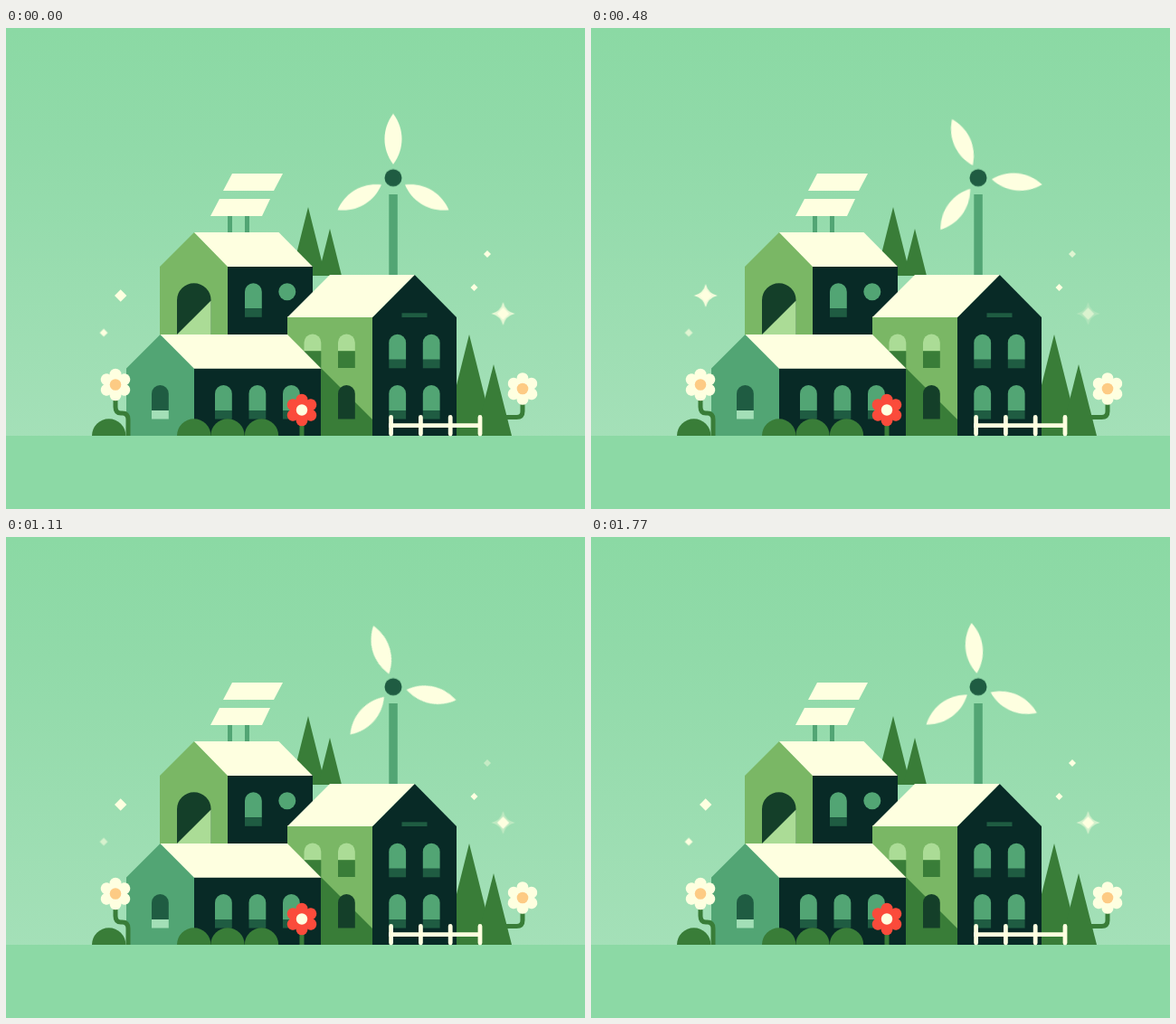
Animation, 640 px wide and 532 px high, one loop 1800 ms. Source, as an HTML page:

```html
<!DOCTYPE html>
<html lang="en">
<head>
<meta charset="utf-8">
<title>Green village</title>
<style>
  html, body { margin: 0; width: 100%; height: 100%; overflow: hidden; background: #8cd9a5; }
  svg { display: block; width: 100%; height: 100%; }

  .ivory { fill: #feffe0; }
  .dark { fill: #082a26; }
  .deep { fill: #143f29; }
  .pine { fill: #1f5c42; }
  .mid { fill: #52a574; }
  .olive { fill: #7ab765; }
  .pale { fill: #abdc96; }
  .leaf { fill: #397d38; }
  .stem { fill: none; stroke: #397d38; stroke-width: 5; }

  /* The small offset keeps each 30 ms step clear of its boundary. */
  .rotor { animation: spin 1.8s steps(60) -4ms infinite; }
  @keyframes spin { to { transform: rotate(360deg); } }

  .twinkle { animation: 1.8s linear infinite; }
  .left-rays { animation-name: left-rays; }
  .right-rays { animation-name: right-rays; }
  .right-core { animation-name: right-core; }
  .left-dot { animation-name: left-dot; }
  .right-dot { animation-name: right-dot; }

  @keyframes left-rays {
    0%, 8% { opacity: 0; }
    16.7% { opacity: .38; }
    26.7% { opacity: .9; }
    34% { opacity: 1; }
    46.7% { opacity: .45; }
    58%, 100% { opacity: 0; }
  }
  @keyframes right-rays {
    0% { opacity: .75; }
    16.7% { opacity: .5; }
    26.7% { opacity: .2; }
    36% { opacity: .5; }
    46.7% { opacity: .9; }
    61.7%, 83.3% { opacity: .35; }
    98.3% { opacity: .55; }
    100% { opacity: .75; }
  }
  @keyframes right-core {
    0%, 16.7% { opacity: 1; }
    26.7% { opacity: .55; }
    38%, 100% { opacity: 1; }
  }
  @keyframes left-dot {
    0%, 16.7% { opacity: 1; }
    26.7% { opacity: .7; }
    46.7% { opacity: .4; }
    61.7% { opacity: .6; }
    80%, 100% { opacity: 1; }
  }
  @keyframes right-dot {
    0%, 16.7% { opacity: 1; }
    26.7% { opacity: .7; }
    46.7% { opacity: .28; }
    61.7% { opacity: .45; }
    83.3% { opacity: .85; }
    92%, 100% { opacity: 1; }
  }
</style>
</head>
<body>
<svg viewBox="0 0 640 532" preserveAspectRatio="none">
  <defs>
    <linearGradient id="sky" x2="0" y2="1">
      <stop stop-color="#8bd9a4"/>
      <stop offset=".3" stop-color="#91daa9"/>
      <stop offset="1" stop-color="#a4e0b8"/>
    </linearGradient>
    <path id="arch" d="M0 28V9.4a9.4 9.4 0 0 1 18.8 0V28z"/>
    <path id="sill" d="M0 28h18.8v9.5H0z"/>
    <g id="window"><use href="#arch" class="mid"/><use href="#sill" class="pine"/></g>
    <path id="blade" d="M0-71C12.7-54 12.7-32 0-15C-12.7-32-12.7-54 0-71z"/>
    <path id="gem" d="M0-1L1 0L0 1L-1 0z"/>
    <path id="rays" d="M0-13Q2.5-2.5 13 0Q2.5 2.5 0 13Q-2.5 2.5-13 0Q-2.5-2.5 0-13z"/>
    <circle id="petal" cy="-11.3" r="6.5"/>
    <g id="petals">
      <circle r="10"/>
      <use href="#petal"/>
      <use href="#petal" transform="rotate(60)"/>
      <use href="#petal" transform="rotate(120)"/>
      <use href="#petal" transform="rotate(180)"/>
      <use href="#petal" transform="rotate(240)"/>
      <use href="#petal" transform="rotate(300)"/>
    </g>
    <path id="bush" d="M-18.7 0a18.7 18.7 0 0 1 37.4 0z"/>
  </defs>

  <rect width="640" height="452" fill="url(#sky)"/>
  <rect y="451" width="640" height="81" fill="#8cd9a5"/>

  <!-- trees -->
  <g class="leaf">
    <path d="M334 198L353 274H315z"/>
    <path d="M358 222L371 274H345z"/>
    <path d="M512 339L540 451H484z"/>
    <path d="M539 372L559 451H519z"/>
  </g>

  <!-- solar panels -->
  <path class="mid" d="M245 207h5v21h-5zM264 207h5v21h-5z"/>
  <path class="ivory" d="M250 161H306L296 180H240zM236 189H292L283 208H226z"/>

  <!-- upper house -->
  <path class="olive" d="M170 264L208 226L246 264V340H170z"/>
  <path class="dark" d="M245 263H339V340H245z"/>
  <path class="ivory" d="M208 226H301.5L339 264H245z"/>
  <path class="deep" d="M189 339V301a18.8 18.8 0 0 1 37.6 0V339z"/>
  <path class="pale" d="M189 339L226.6 301.5V339z"/>
  <use href="#window" x="264" y="282.3"/>
  <circle class="mid" cx="310.8" cy="291.7" r="9.5"/>

  <!-- turbine -->
  <path class="mid" d="M423.3 184h9.5v90h-9.5z"/>
  <g transform="translate(428 165.7)">
    <g class="rotor ivory">
      <use href="#blade"/>
      <use href="#blade" transform="rotate(120)"/>
      <use href="#blade" transform="rotate(240)"/>
    </g>
    <circle class="pine" r="9.5"/>
  </g>

  <!-- right house -->
  <path class="olive" d="M311 319H406V451H311z"/>
  <path class="leaf" d="M348 376L405 433V451H348z"/>
  <path class="dark" d="M405 320L451.7 273L498 320V451H405z"/>
  <path class="ivory" d="M311 320L358 273H451.7L405 320z"/>
  <g transform="translate(329.5 338.5)">
    <path class="pale" d="M0 18.8V9.4a9.4 9.4 0 0 1 18.8 0v9.4z"/>
    <path class="leaf" d="M0 18.8h18.8v18.7H0z"/>
  </g>
  <g transform="translate(367 338.5)">
    <path class="pale" d="M0 18.8V9.4a9.4 9.4 0 0 1 18.8 0v9.4z"/>
    <path class="leaf" d="M0 18.8h18.8v18.7H0z"/>
  </g>
  <g class="deep"><use href="#arch" x="367" y="395"/><use href="#sill" x="367" y="395"/></g>
  <path class="pine" d="M437.5 315.3h28v4.7h-28z"/>
  <use href="#window" x="423.3" y="338.8"/>
  <use href="#window" x="460.8" y="338.8"/>
  <use href="#window" x="423.3" y="395"/>
  <use href="#window" x="460.8" y="395"/>

  <!-- front house -->
  <path class="mid" d="M133 376.5L170.5 339L209 376.5V451H133z"/>
  <path class="dark" d="M208 376H348V451H208z"/>
  <path class="ivory" d="M170.5 339H311L348.5 376.7H208z"/>
  <use href="#arch" class="pine" x="161" y="395"/>
  <use href="#sill" fill="#a3dfb7" x="161" y="395"/>
  <use href="#window" x="231" y="395"/>
  <use href="#window" x="268.5" y="395"/>
  <use href="#window" x="306" y="395"/>

  <g class="leaf">
    <use href="#bush" x="113.7" y="451"/>
    <use href="#bush" x="207.7" y="451"/>
    <use href="#bush" x="245" y="451"/>
    <use href="#bush" x="282.5" y="451"/>
  </g>

  <!-- fence -->
  <path class="ivory" d="M423 437.3h103v4.7H423z"/>
  <path fill="none" stroke="#feffe0" stroke-width="4.8" stroke-linecap="round"
    d="M425.6 430.4V449M458.4 430.4V449M491.2 430.4V449M524 430.4V449"/>

  <!-- flowers -->
  <path class="stem" d="M121 406V419Q121 426 127 426H128.5Q135 426 135 433V451"/>
  <path class="stem" d="M571 411V424Q571 430.5 564.5 430.5H553"/>
  <path class="stem" d="M327 434V451"/>
  <g transform="translate(121 394.5)"><use href="#petals" class="ivory"/><circle r="6.3" fill="#fdcb84"/></g>
  <g transform="translate(571 399)"><use href="#petals" class="ivory"/><circle r="6.3" fill="#fdcb84"/></g>
  <g transform="translate(327 422.5)"><use href="#petals" fill="#fb4b3b"/><circle class="ivory" r="6.2"/></g>

  <!-- sparkles -->
  <g class="ivory">
    <g transform="translate(126.7 296)">
      <use href="#rays" class="twinkle left-rays"/>
      <use href="#gem" transform="scale(6.7)"/>
    </g>
    <g transform="translate(549.5 316)">
      <use href="#rays" class="twinkle right-rays"/>
      <g class="twinkle right-core"><use href="#gem" transform="scale(6.7)"/></g>
    </g>
    <g class="twinkle left-dot"><use href="#gem" transform="translate(108 337) scale(4.4)"/></g>
    <g class="twinkle right-dot"><use href="#gem" transform="translate(532 250) scale(4)"/></g>
    <use href="#gem" transform="translate(517.5 287) scale(4)"/>
  </g>
</svg>
</body>
</html>
```
